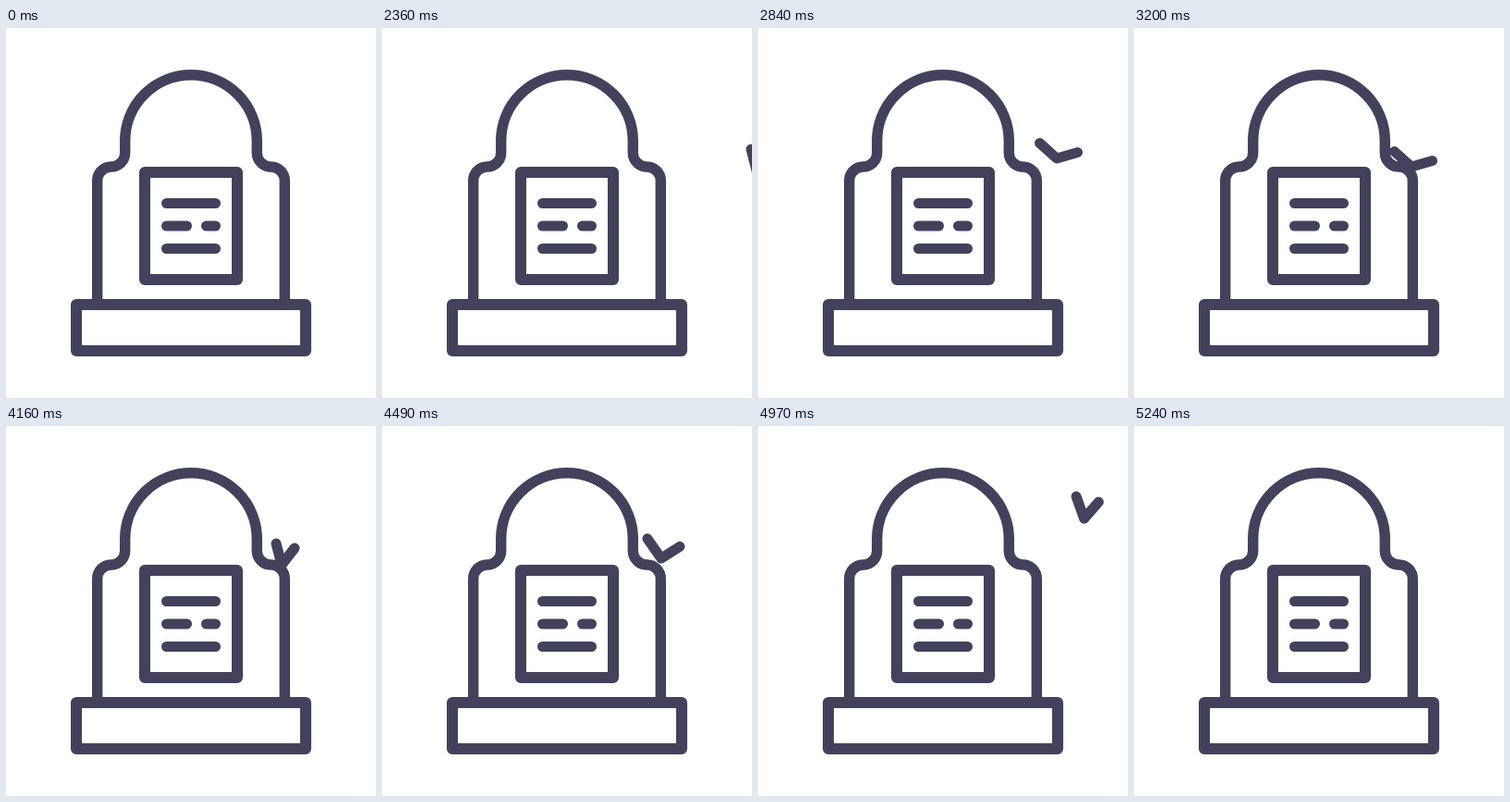
These frames come from a looping animation (400x400 px, 5630 ms). An HTML page:

```html
<!DOCTYPE html>
<html lang="en">
<head>
<meta charset="utf-8">
<title>Tombstone and bird</title>
<style>
  html, body { margin: 0; width: 100%; height: 100%; overflow: hidden; background: #fff; }
  svg { display: block; width: 100vw; height: 100vh; }
  g { fill: none; stroke: #43415b; stroke-width: 11.4; stroke-linecap: round; stroke-linejoin: round; }
</style>
</head>
<body>
<svg viewBox="0 0 400 400">
  <g>
    <path d="M98.7 299V165A15 15 0 0 1 113.7 150A15 15 0 0 0 128.7 135V122A71.3 71.3 0 0 1 271.3 122V135A15 15 0 0 0 286.3 150A15 15 0 0 1 301.3 165V299"/>
    <path stroke-width="12" d="M76 299H324V349H76ZM150 156H250V272H150Z"/>
    <path stroke-width="11" d="M173.5 189.5H226.5M173.5 214H195.5M216.5 214H226.5M173.5 238.5H226.5"/>
    <path id="bird" stroke-width="11"/>
  </g>
</svg>
<script>
const LOOP = 5630, ENTER = 2360, LEAVE = 5240, STEP = 30;
const bird = document.getElementById('bird');

// [time, x, y] of the bird's body
const flight = [
  [2360, 405, 154], [2500, 380, 146], [2670, 350, 138], [2840, 323, 141],
  [2900, 315.5, 143], [3015, 305, 146.5], [3200, 300, 150], [3590, 298, 150],
  [4160, 298, 150], [4400, 300, 147.5], [4730, 313, 126], [5000, 359, 98], [5240, 424, 97]
];

// [time, spread] with 0 for folded and 1 for open wings
const flaps = [
  [2360, 0], [2500, 1], [2670, 0], [2835, 1], [3015, 0], [3195, 1], [3590, 0],
  [4160, 0], [4400, 1], [4650, 0], [4840, 1], [5025, 0], [5240, 1]
];

const mix = (a, b, k) => a + (b - a) * k;

function segment(keys, t) {
  let i = 0;
  while (i < keys.length - 2 && t >= keys[i + 1][0]) i++;
  return i;
}

function slope(keys, i, c) {
  const a = keys[i - 1], b = keys[i], d = keys[i + 1];
  if (b[0] === 3590 || b[0] === 4160) return 0;   // perched
  const p = a || b, n = d || b;
  return (n[c] - p[c]) / (n[0] - p[0]);
}

function along(keys, t, c) {
  const i = segment(keys, t), a = keys[i], b = keys[i + 1];
  const h = b[0] - a[0], u = (t - a[0]) / h, v = 1 - u;
  return a[c] * (1 + 2 * u) * v * v + b[c] * u * u * (3 - 2 * u)
    + h * u * v * (v * slope(keys, i, c) - u * slope(keys, i + 1, c));
}

function spreadAt(t) {
  const i = segment(flaps, t), [t0, s0] = flaps[i], [t1, s1] = flaps[i + 1];
  return mix(s0, s1, (1 - Math.cos(Math.PI * (t - t0) / (t1 - t0))) / 2);
}

function pose(t) {
  if (t < ENTER || t >= LEAVE) return '';
  t = ENTER + Math.floor((t - ENTER) / STEP) * STEP;
  const x = along(flight, t, 1), y = along(flight, t, 2);
  const s = spreadAt(t), lift = 14 * s * (1 - s);
  const left = [x + mix(-6, -18.5, s), y + mix(-23, -16.5, s) - lift];
  const right = [x + mix(14, 22.5, s), y + mix(-18, -6.5, s) - lift];
  return `M${left}L${x},${y}L${right}`;
}

const start = performance.now();
function frame() {
  bird.setAttribute('d', pose((performance.now() - start) % LOOP));
  requestAnimationFrame(frame);
}
frame();
</script>
</body>
</html>
```
